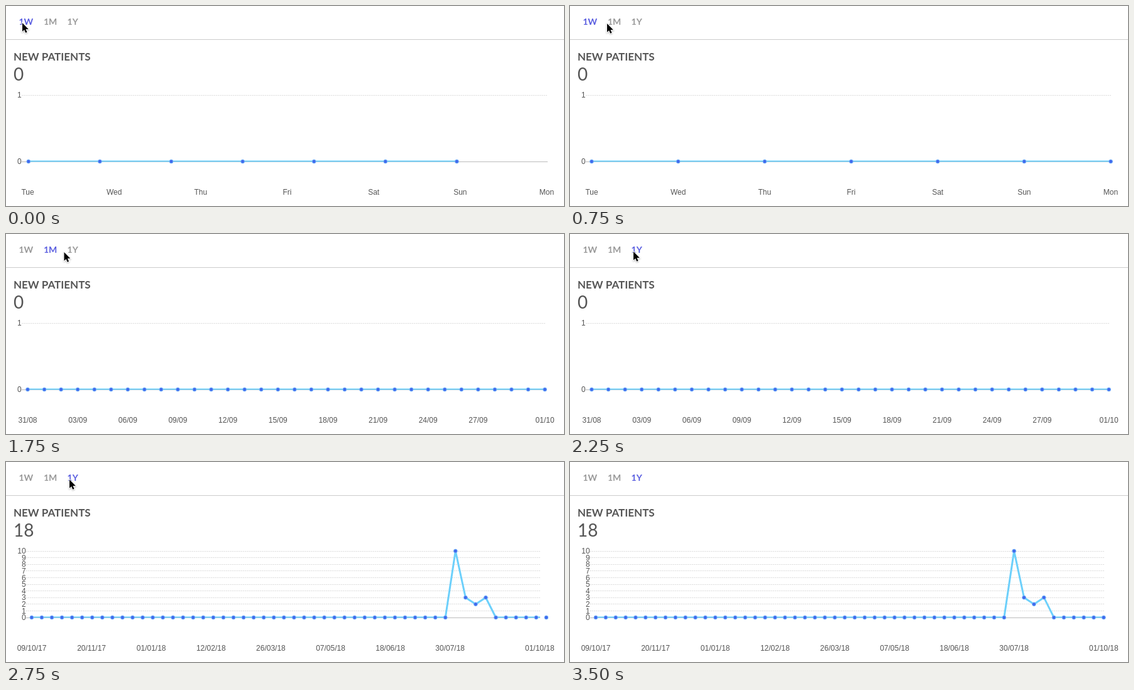
Animation, 888 px wide and 319 px high, one loop 4 s. Source, as an HTML page:

```html
<!DOCTYPE html>
<html lang="en">
<head>
<meta charset="utf-8">
<title>New patients chart</title>
<style>
  html, body { margin: 0; width: 100%; height: 100%; overflow: hidden; background: #fff; }
  svg { display: block; width: 100%; height: 100%; }
  .ui { font-family: Lato, sans-serif; fill: #555; }
  .tab { font-size: 14px; font-weight: 700; fill: #999; }
  .tab.on { fill: #5a5ee0; }
  .axis { font: 12px "Liberation Sans", Arial, sans-serif; fill: #555; }
  .grid { stroke: #ddd; stroke-dasharray: 2 1; }
  .base { stroke: #bbb; }
  .line { fill: none; stroke: #6dd0fb; stroke-width: 3; stroke-linejoin: round; }
  .dot { fill: #4068ec; stroke: #74b4fb; stroke-width: 1; }
</style>
</head>
<body>
<svg viewBox="0 0 888 319" xmlns="http://www.w3.org/2000/svg">
  <defs>
    <clipPath id="plot"><rect id="plotBox" x="25" y="142" width="837" height="106.4"/></clipPath>
    <clipPath id="frame"><rect x="12" y="130" width="864" height="180"/></clipPath>
    <filter id="shade" x="-50%" y="-50%" width="200%" height="200%">
      <feDropShadow dx="0" dy="1" stdDeviation="0.8" flood-opacity="0.35"/>
    </filter>
  </defs>
  <g id="tabs" class="ui">
    <text class="tab" x="20.4" y="30">1W</text>
    <text class="tab" x="60" y="30">1M</text>
    <text class="tab" x="97.6" y="30">1Y</text>
  </g>
  <path d="M0 53.5H888" stroke="#ccc"/>
  <text class="ui" x="12" y="87" font-size="17" font-weight="700">NEW PATIENTS</text>
  <text id="total" class="ui" x="12" y="119.3" font-size="28">0</text>
  <g id="axes"></g>
  <path id="line" class="line" clip-path="url(#plot)"/>
  <g id="dots" clip-path="url(#frame)"></g>
  <path id="cursor" d="M0 0V13.8L3.1 10.9L5.2 15.8L7.6 14.8L5.5 10H9.8Z"
        stroke="#fff" stroke-width="1.6" paint-order="stroke" filter="url(#shade)"/>
</svg>
<script>
const LOOP = 4000, TICK = 250, EASE = 750;
const TOP = 142, BASE = 248;
const $ = id => document.getElementById(id);

// x0: first point, dx: spacing, every: points per axis label
const week = {
  x0: 34.5, dx: 137.67, n: 7, every: 1, left: 25, right: 862, max: 1, total: 0,
  labels: ["Tue", "Wed", "Thu", "Fri", "Sat", "Sun", "Mon"], values: {}
};
const month = {
  x0: 34.5, dx: 26.55, n: 32, every: 3, left: 25, right: 858.5, max: 1, total: 0,
  labels: ["31/08", "03/09", "06/09", "09/09", "12/09", "15/09", "18/09", "21/09", "24/09", "27/09"],
  last: "01/10", values: {}
};
const year = {
  x0: 41, dx: 15.85, n: 52, every: 6, left: 32, right: 850, max: 10, total: 18,
  labels: ["09/10/17", "20/11/17", "01/01/18", "12/02/18", "26/03/18", "07/05/18", "18/06/18", "30/07/18"],
  last: "01/10/18", values: { 42: 10, 43: 3, 44: 2, 45: 3 }
};

// begin: start of the easing, at: when the new view shows
const views = [
  { at: 0, begin: -250, to: week, from: year },
  { at: 1000, begin: 844, to: month, from: week },
  { at: 2500, begin: 2280, to: year, from: month }
];
const tabs = [{ at: 0, i: 0 }, { at: 1000, i: 1 }, { at: 2250, i: 2 }];
const moves = [
  { at: 0, x: 26, y: 27 }, { at: 250, x: 41, y: 28 }, { at: 500, x: 59, y: 28 },
  { at: 1500, x: 70, y: 28 }, { at: 1750, x: 92.5, y: 29 }, { at: 2000, x: 101, y: 28 },
  { at: 3250, x: 125, y: 15.5 }, { at: 3500, hidden: true }
];

const latest = (list, t) => list.filter(e => e.at <= t).pop();
const mix = (a, b, k) => a + (b - a) * k;
const label = (x, y, s, anchor) =>
  `<text class="axis" x="${x}" y="${y}" text-anchor="${anchor}">${s}</text>`;

function drawAxes(c) {
  let out = "";
  for (let v = 0; v <= c.max; v++) {
    const y = BASE - (BASE - TOP) * v / c.max;
    const row = Math.floor(y) + 0.5;
    out += `<path class="${v ? "grid" : "base"}" d="M${c.left} ${row}H${c.right}"/>`;
    out += label(c.left - 0.4, y + 4.2, v, "end");
  }
  c.labels.forEach((s, i) => out += label(c.x0 + i * c.every * c.dx, 301, s, "middle"));
  if (c.last) out += label(c.x0 + (c.n - 1) * c.dx, 301, c.last, "middle");
  $("axes").innerHTML = out;
  $("plotBox").setAttribute("x", c.left);
  $("plotBox").setAttribute("width", c.right - c.left);
  $("total").textContent = c.total;
}

function drawSeries({ to, from, begin }, t) {
  const p = Math.min(1, (t - begin) / EASE);
  const k = 1 - (1 - p) ** 4;
  const x0 = mix(from.x0, to.x0, k), dx = mix(from.dx, to.dx, k);
  const pts = Array.from({ length: to.n }, (_, i) => [
    (x0 + i * dx).toFixed(2),
    (BASE - (BASE - TOP) * (to.values[i] || 0) / to.max).toFixed(2)
  ]);
  $("line").setAttribute("d", "M" + pts.map(q => q.join(" ")).join("L"));
  $("dots").innerHTML = pts.map(([x, y]) =>
    `<circle class="dot" cx="${x}" cy="${y}" r="2.9"/>`).join("");
}

function drawCursor(m) {
  $("cursor").style.display = m.hidden ? "none" : "";
  if (!m.hidden) $("cursor").setAttribute("transform", `translate(${m.x} ${m.y})`);
}

let shown = -1;
function render(ms) {
  const t = Math.floor(ms % LOOP / TICK) * TICK;
  if (t === shown) return;
  shown = t;
  const view = latest(views, t);
  drawAxes(view.to);
  drawSeries(view, t);
  const active = latest(tabs, t).i;
  [...$("tabs").children].forEach((el, i) => el.classList.toggle("on", i === active));
  drawCursor(latest(moves, t));
}

const start = performance.now();
function loop() {
  render(performance.now() - start);
  requestAnimationFrame(loop);
}
loop();
</script>
</body>
</html>
```
